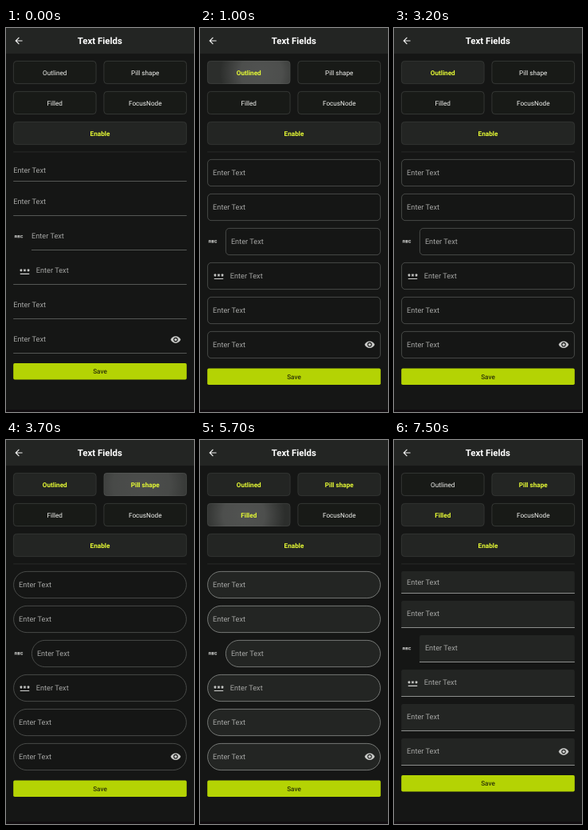
Recreate the animation shown at these times as an HTML page with a canvas. Size 236x480 px, loop 8000 ms.

```html
<!DOCTYPE html>
<html lang="en">
<head>
<meta charset="utf-8">
<title>Text Fields</title>
<style>
  html, body { margin: 0; width: 100%; height: 100%; overflow: hidden; background: #151615; }
  canvas { display: block; width: 236px; height: 480px; }
</style>
</head>
<body>
<canvas id="stage"></canvas>
<script>
const LOOP = 8000, STEP = 100;
const LEFT = 9.2, RIGHT = 226.8;
const LIME = '#e6fa35', HINT = '#a5a6a4';

const canvas = document.getElementById('stage');
const ctx = canvas.getContext('2d');
const ratio = window.devicePixelRatio || 1;
canvas.width = 236 * ratio;
canvas.height = 480 * ratio;

// Icons live on a 24-unit grid.
const star = x => `M${x - .85} 12.95l.85-1.48.85 1.48 1.3-.75-.85-1.48h1.7v-1.5h-1.7l.85-1.47-1.3-.75-.85 1.47-.85-1.47-1.3.75.85 1.47h-1.7v1.5h1.7l-.85 1.48z`;
const icons = {
  back: 'M20 11H7.83l5.59-5.59L12 4l-8 8 8 8 1.41-1.41L7.83 13H20z',
  eye: 'M12 4.5C7 4.5 2.73 7.61 1 12c1.73 4.39 6 7.5 11 7.5s9.27-3.11 11-7.5c-1.73-4.39-6-7.5-11-7.5z'
    + 'M12 17c-2.76 0-5-2.24-5-5s2.24-5 5-5 5 2.24 5 5-2.24 5-5 5zm0-8c-1.66 0-3 1.34-3 3s1.34 3 3 3 3-1.34 3-3-1.34-3-3-3z',
  abc: 'M21 11h-1.5v-.5h-2v3h2V13H21v1c0 .55-.45 1-1 1h-3c-.55 0-1-.45-1-1v-4c0-.55.45-1 1-1h3c.55 0 1 .45 1 1z'
    + 'M8 10v5H6.5v-1.5h-2V15H3v-5c0-.55.45-1 1-1h3c.55 0 1 .45 1 1zm-1.5.5h-2V12h2z'
    + 'M13.5 12c.55 0 1 .45 1 1v1c0 .55-.45 1-1 1h-4V9h4c.55 0 1 .45 1 1v1c0 .55-.45 1-1 1zM11 10.5v.75h2v-.75zm2 2.25h-2v.75h2z',
  password: 'M2 17h20v2H2z' + [4, 12, 20].map(star).join('')
};
for (const name in icons) icons[name] = new Path2D(icons[name]);

const buttons = [
  { label: 'Outlined', x: 9, y: 41, w: 104.5, on: t => t >= 900 && t < 7000 },
  { label: 'Pill shape', x: 122.5, y: 41, w: 104.5, on: t => t >= 3500 },
  { label: 'Filled', x: 9, y: 79, w: 104.5, on: t => t >= 5600 },
  { label: 'FocusNode', x: 122.5, y: 79, w: 104.5, on: () => false },
  { label: 'Enable', x: 9, y: 117, w: 218, on: () => true }
];

const taps = [
  { button: 0, x: 77, y: 56, press: 900, spread: 900, end: 1700 },
  { button: 1, x: 170, y: 56, press: 3500, spread: 3500, end: 4300 },
  { button: 2, x: 55, y: 94, press: 5600, spread: 5600, end: 6400 },
  { button: 0, x: 92.5, y: 57, press: 6800, spread: 6900, end: 7500 }
];

const progress = (t, start, length) => Math.min(1, Math.max(0, (t - start) / length));

function text(label, x, y, size, color, weight = 400, align = 'center') {
  ctx.font = `${weight} ${size}px Roboto, sans-serif`;
  ctx.textRendering = 'geometricPrecision';
  ctx.textAlign = align;
  ctx.fillStyle = color;
  ctx.fillText(label, x, y + size * .355);
}

function icon(name, x, y, color) {
  const scale = .574;
  ctx.save();
  ctx.translate(x - 12 * scale, y - 12 * scale);
  ctx.scale(scale, scale);
  ctx.fillStyle = color;
  ctx.fill(icons[name], 'evenodd');
  ctx.restore();
}

function box(x, y, w, h, radius, fill, stroke) {
  ctx.beginPath();
  ctx.roundRect(x + .4, y + .4, w - .8, h - .8, radius);
  if (fill) { ctx.fillStyle = fill; ctx.fill(); }
  ctx.strokeStyle = stroke;
  ctx.lineWidth = .8;
  ctx.stroke();
}

function line(x, y, color) {
  ctx.fillStyle = color;
  ctx.fillRect(x, y, RIGHT - x, 1);
}

function ripple(tap, b, t) {
  if (t < tap.press || t >= tap.end) return;
  const fade = 1 - progress(t, tap.spread, tap.end - tap.spread);
  ctx.save();
  ctx.beginPath();
  ctx.roundRect(b.x, b.y, b.w, 29, 4);
  ctx.clip();
  ctx.fillStyle = `rgba(255,255,255,${.05 * fade})`;
  ctx.fillRect(b.x, b.y, b.w, 29);
  if (t >= tap.spread) {
    const age = t - tap.spread;
    const radius = 6 + 46 * Math.sqrt(age / 100);
    const alpha = (age ? .2 : .11) * fade;
    const glow = ctx.createRadialGradient(tap.x, tap.y, 0, tap.x, tap.y, radius);
    glow.addColorStop(0, `rgba(255,255,255,${alpha})`);
    glow.addColorStop(.5, `rgba(255,255,255,${alpha * .9})`);
    glow.addColorStop(1, 'rgba(255,255,255,0)');
    ctx.fillStyle = glow;
    ctx.fillRect(b.x, b.y, b.w, 29);
  }
  ctx.restore();
}

function drawButton(b, index, t) {
  const on = b.on(t);
  box(b.x, b.y, b.w, 29, 4, on ? '#232523' : '#181a17', on ? '#383a38' : '#3d3f3d');
  taps.filter(tap => tap.button === index).forEach(tap => ripple(tap, b, t));
  text(b.label, b.x + b.w / 2, b.y + 14.6, 8.2, on ? LIME : '#f1f2ef', on ? 700 : 400);
}

function drawField(index, t) {
  const outlined = buttons[0].on(t), filled = buttons[2].on(t);
  const x = index === 2 ? 32 : LEFT;
  const bottom = (outlined ? 198 : 192) + index * 43 - (!outlined && index ? .5 : 0);
  const height = outlined ? 34 : index ? 33.5 : 28;
  const top = bottom - height;
  const middle = outlined ? top + 16.3 : index ? 174.2 + index * 43 : 177.6;
  const fill = filled ? '#232523' : null;
  const edge = filled ? '#8c8e8c' : '#555755';

  if (outlined) {
    const radius = 4.5 + 12 * progress(t, 3430, 167);
    box(x, top, RIGHT - x, height, radius, fill, edge);
  } else {
    if (filled) {
      ctx.fillStyle = fill;
      ctx.beginPath();
      ctx.roundRect(x, top, RIGHT - x, height, [2.3, 2.3, 0, 0]);
      ctx.fill();
    }
    line(x, Math.floor(bottom - .5), edge);
  }

  if (index === 2) icon('abc', 16, middle + .4, '#c4c5c3');
  if (index === 3) icon('password', 23.5, middle + .8, '#d2d3d1');
  if (index === 5) icon('eye', 213, middle + .4, '#c9cac8');
  const inset = outlined || filled ? 6.9 : 0;
  text('Enter Text', index === 3 ? 37.8 : x + inset, middle, 9.2, HINT, 400, 'left');
}

function draw(t) {
  ctx.setTransform(ratio, 0, 0, ratio, 0, 0);
  ctx.fillStyle = '#151615';
  ctx.fillRect(0, 0, 236, 480);
  ctx.fillStyle = '#232523';
  ctx.fillRect(0, 0, 236, 32);
  ctx.fillStyle = '#100c0f';
  ctx.fillRect(0, 477, 236, 3);

  icon('back', 16, 16, '#f2f2f2');
  text('Text Fields', 117.8, 16.3, 11.45, '#fff', 700);
  buttons.forEach((b, i) => drawButton(b, i, t));
  line(LEFT, 154.4, '#282a28');
  for (let i = 0; i < 6; i++) drawField(i, t);

  const saveTop = buttons[0].on(t) ? 425.6 : 419.1;
  ctx.fillStyle = '#b4d304';
  ctx.beginPath();
  ctx.roundRect(LEFT, saveTop, RIGHT - LEFT, 20.4, 1.8);
  ctx.fill();
  text('Save', 118, saveTop + 10.1, 8.2, '#2d3408', 500);
}

const start = performance.now();
function tick() {
  const elapsed = (performance.now() - start) % LOOP;
  draw(Math.floor(elapsed / STEP) * STEP);
  requestAnimationFrame(tick);
}
tick();
</script>
</body>
</html>
```
